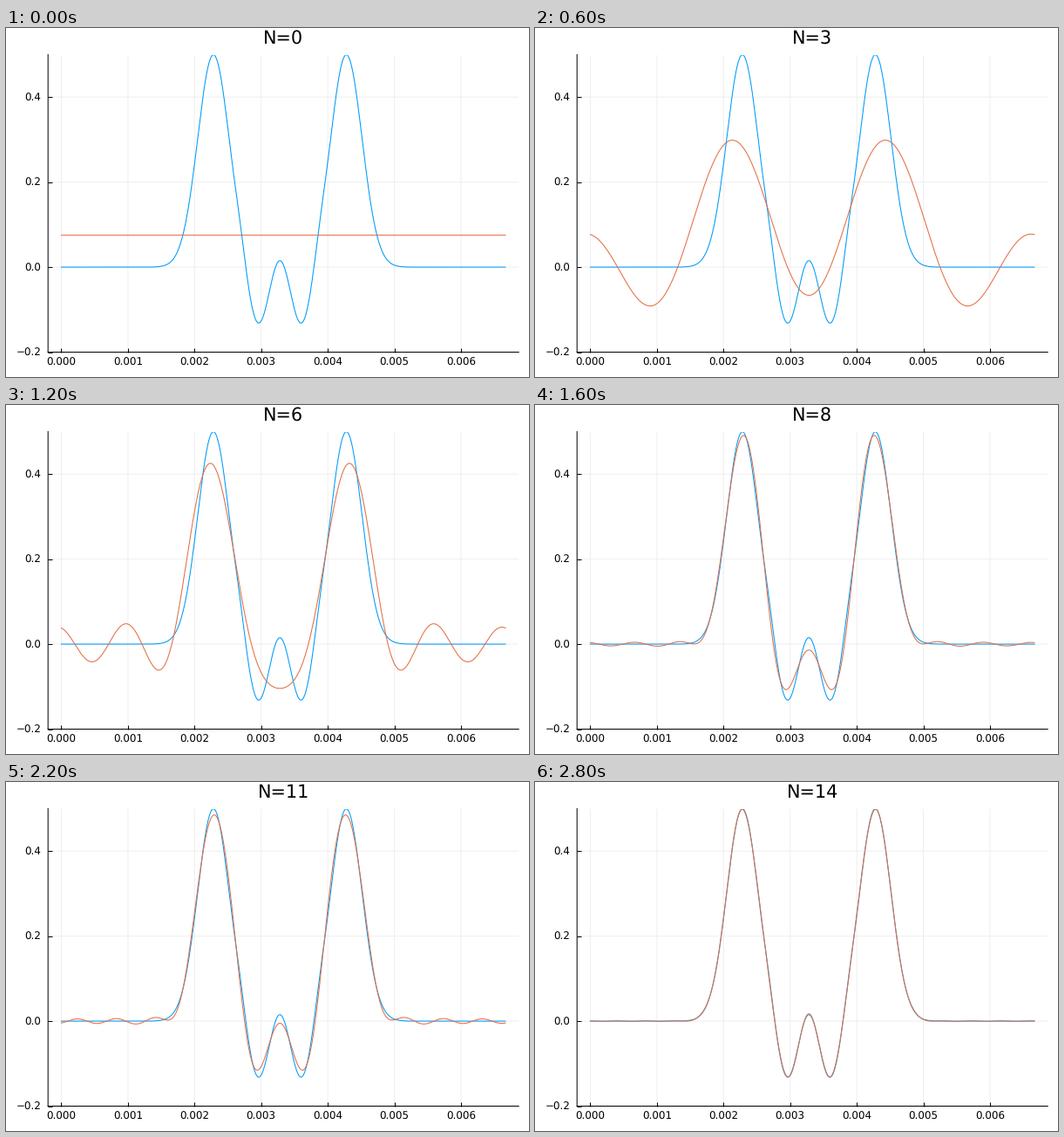
A matplotlib script that plays this animation: 600 by 400 pixels, repeating every 3000 ms.

```python
import numpy as np
import matplotlib.pyplot as plt
from matplotlib.animation import FuncAnimation

W, H, DPI = 600, 400, 100
PX = 72 / DPI                 # points per pixel
PERIOD = 1 / 150              # seconds
CENTER = 0.003281
FRAMES, INTERVAL = 15, 200
BLUE, ORANGE = "#009afa", "#e36f47"

plt.rcParams.update({
    "font.family": "DejaVu Sans",
    "text.hinting": "none",
    "path.snap": False,
})


def bell(t, mid, sigma):
    return np.exp(-((t - mid) / sigma) ** 2 / 2)


def pulse(x):
    """Two tall lobes around a double dip with a small middle bump."""
    t = (x - CENTER) * 1000
    tall = bell(t, -0.998, 0.2357) + bell(t, 0.998, 0.2357)
    reach = 0.66
    dips = np.where(abs(t) < reach, np.sin(np.pi * t / reach) ** 2, 0)
    return 0.5 * tall - 0.141 * dips + 0.0153 * bell(t, 0, 0.131)


x = np.linspace(0, PERIOD, 295)
y = pulse(x)
coef = np.fft.rfft(y[:-1]) / (len(x) - 1)


def partial_sum(n):
    total = np.full_like(x, coef[0].real)
    for k in range(1, n + 1):
        total += 2 * (coef[k] * np.exp(2j * np.pi * k * x / PERIOD)).real
    return total


fig = plt.figure(figsize=(W / DPI, H / DPI), dpi=DPI, facecolor="white")
left, right, top, bottom = 48.2, 588.2, 30.5, 371.5
ax = fig.add_axes([left / W, 1 - bottom / H, (right - left) / W, (bottom - top) / H])
ax.set_xlim(-0.03 * PERIOD, 1.03 * PERIOD)
ax.set_ylim(-0.2, 0.5)

xticks = np.arange(7) / 1000
yticks = [-0.2, 0.0, 0.2, 0.4]
ax.set_xticks(xticks, [f"{v:.3f}" for v in xticks])
ax.set_yticks(yticks, [f"{v:.1f}".replace("-", "\u2212") for v in yticks])
ax.tick_params(direction="in", length=5 * PX, width=PX, labelsize=11.9 * PX)
ax.tick_params(axis="x", pad=6.3 * PX)
ax.tick_params(axis="y", pad=7.9 * PX)
ax.set_axisbelow(True)
ax.grid(color="#efefef", linewidth=PX)
for side in ("top", "right"):
    ax.spines[side].set_visible(False)
for side in ("left", "bottom"):
    ax.spines[side].set_linewidth(PX)

ax.plot(x, y, color=BLUE, lw=1.05 * PX)
series, = ax.plot(x, partial_sum(0), color=ORANGE, lw=1.05 * PX)
title = fig.text((left + right) / 2 / W, 1 - 18 / H, "N=0", size=20.8 * PX,
                 ha="center", va="baseline")


def update(n):
    series.set_ydata(partial_sum(n))
    title.set_text(f"N={n}")
    return series, title


anim = FuncAnimation(fig, update, frames=FRAMES, interval=INTERVAL,
                     repeat=True, repeat_delay=0, blit=False)
plt.show()
```
